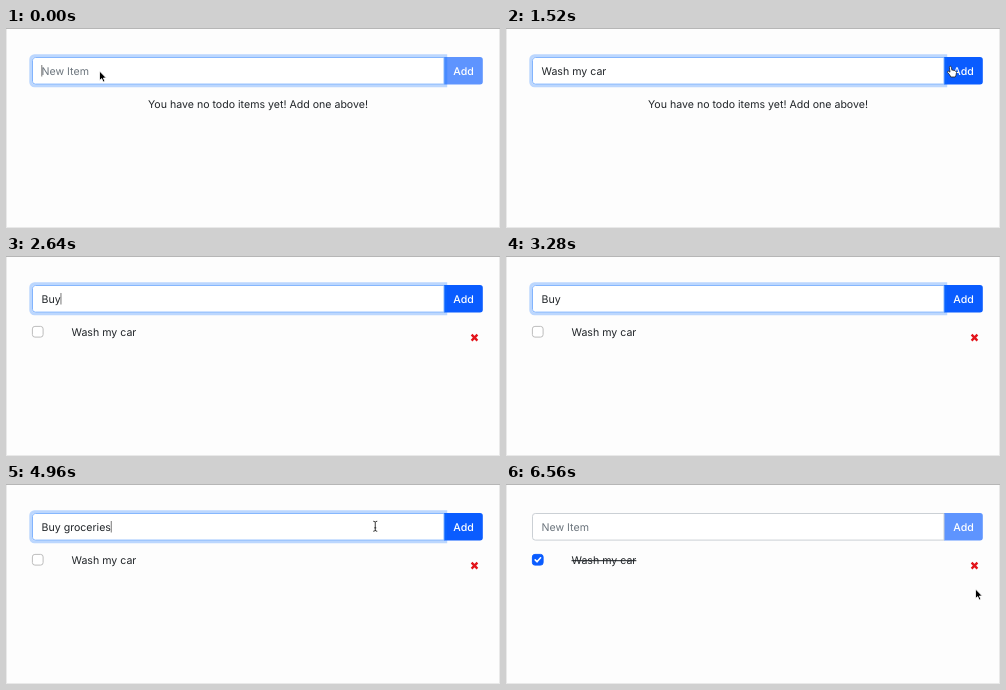
An HTML page for the animation above (6.64 s loop, 494 by 200 pixels).

```html
<!DOCTYPE html>
<html lang="en">
<head>
<meta charset="utf-8">
<title>Todo list</title>
<style>
  html, body { margin: 0; width: 100%; height: 100%; overflow: hidden; background: #fdfdfd; }
  svg { display: block; width: 494px; height: 200px; }
  text { font: 400 10.6px Inter, "Liberation Sans", sans-serif; fill: #212529; white-space: pre; text-rendering: geometricPrecision; }
  .hint { fill: #6c757d; }
  .add { font-weight: 500; fill: #fff; text-anchor: middle; }
  .ring { fill: none; stroke: #0d6efd; stroke-opacity: .27; stroke-width: 2.8; }
  .done text { text-decoration: line-through; }
  .box { fill: #fff; stroke: #bdbdbd; }
  .done .box { fill: #0a5cff; stroke: #0a5cff; }
  .tick { fill: none; stroke: #fff; stroke-width: 1.6; stroke-linecap: round; stroke-linejoin: round; visibility: hidden; }
  .done .tick { visibility: visible; }
  .remove { stroke: #e3141b; stroke-width: 2.3; }
</style>
</head>
<body>
<svg viewBox="0 0 494 200">
  <rect width="494" height="200" fill="#fdfdfd"/>
  <path d="M.5 0V200M493.5 0V200M0 199.5H494" stroke="#e9e9e9"/>
  <path d="M0 .5H494" stroke="#b6b6b6"/>

  <path id="button" d="M438 29h36a2.8 2.8 0 0 1 2.8 2.8v21.9a2.8 2.8 0 0 1-2.8 2.8h-36z" fill="#0a5cff"/>
  <text class="add" x="457.5" y="46.7">Add</text>
  <path id="field" d="M438 29.5H29.3a2.8 2.8 0 0 0-2.8 2.8v21a2.8 2.8 0 0 0 2.8 2.8H438z" fill="#fff"/>
  <path id="fieldRing" class="ring" d="M439.8 27.7H28.5a3.8 3.8 0 0 0-3.8 3.8v22.6a3.8 3.8 0 0 0 3.8 3.8H439.8z"/>
  <text id="value" x="35.5" y="46.7"></text>
  <path id="caret" d="M0 37V48.5" stroke="#555" stroke-width=".8"/>

  <text id="empty" x="252" y="80" text-anchor="middle">You have no todo items yet! Add one above!</text>
  <g id="items"></g>
  <rect id="checkRing" class="ring" x="24.6" y="68.6" width="14.3" height="14.3" rx="3.8"/>

  <g id="pointer">
    <path data-kind="arrow" d="M0 0V9.6L2.2 7.6L3.7 11L5.4 10.3L3.9 7H6.8Z" fill="#000" stroke="#fff" stroke-width=".8"/>
    <path data-kind="beam" d="M-2 -5Q0 -5 0 -3.8Q0 -5 2 -5M0 -3.8V3.8M-2 5Q0 5 0 3.8Q0 5 2 5M-1 1.6H1" fill="none" stroke="#222" stroke-width=".9"/>
    <path data-kind="hand" d="M-1.6 -2.6Q-1.6 -3.8 -.7 -3.8Q.2 -3.8 .4 -2.6L.9 .2Q2.2 -.5 2.7 .6Q4 .1 4.3 1.2Q5.5 1 5.5 2.5L5 5.2L4.2 7H-.2L-1.4 4.7L-3.6 2.2Q-3.6 1 -2.4 1.2L-1 2.2Z" fill="#fff" stroke="#222" stroke-width=".8"/>
  </g>
</svg>
<script>
const LOOP = 6640, STEP = 80, FADE = 150;
const $ = id => document.getElementById(id);

// Start times of each typing burst
const bursts = [
  { from: 160, text: 'Wash my car', clear: 1680 },
  { from: 2480, text: 'Buy ', clear: 4160 },
  { from: 4160, text: 'groceries', prefix: 'Buy ', clear: 5200 }
];
const focusSpans = [[-1000, 1680], [2320, 5200]];
const checkSpans = [[5840, 6400]];
const tracks = [
  [[0, 93.5, 43], [160, 93.5, 43]],
  [[1120, 93.5, 43], [1500, 445, 42], [1680, 445, 42], [2080, 283, 43], [2320, 150, 43], [2480, 150, 43]],
  [[4800, 150, 43], [5040, 446, 42], [5200, 446, 42], [5440, 377, 76], [5760, 31, 75],
   [5920, 31, 75], [6240, 440, 118], [6400, 470, 106], [6560, 469.5, 105], [LOOP, 469.5, 105]]
];
const rows = [
  { text: 'Wash my car', from: 1680, to: LOOP, done: 5840 },
  { text: 'Buy groceries', from: 5200, to: 6480, done: Infinity }
];

$('items').innerHTML = rows.map((row, i) => `
  <g transform="translate(0 ${i * 27})">
    <rect class="box" x="26.4" y="70.4" width="10.7" height="10.7" rx="2.5"/>
    <path class="tick" d="M29.2 75.9L31 77.8L34.6 73.8"/>
    <text x="65.5" y="80">${row.text}</text>
    <path class="remove" d="M465.6 78.6L471.4 84.6M471.4 78.6L465.6 84.6"/>
  </g>`).join('');
const rowNodes = [...$('items').children];
const cursors = [...$('pointer').children];

const clamp = v => Math.max(0, Math.min(1, v));
const ease = v => v * v * (3 - 2 * v);
const show = (node, on) => node.setAttribute('visibility', on ? 'visible' : 'hidden');
const glow = (t, spans) => Math.max(...spans.map(([a, b]) =>
  ease(clamp((t - a) / FADE)) * (1 - ease(clamp((t - b) / FADE)))));

function typed(t) {
  const burst = bursts.find(b => t >= b.from && t < b.clear);
  if (!burst) return { text: '', last: t < 2000 ? 0 : 2320 };
  const n = Math.min(burst.text.length, Math.floor((t - burst.from) / STEP) + 1);
  return { text: (burst.prefix || '') + burst.text.slice(0, n), last: burst.from + (n - 1) * STEP };
}

function pointerAt(t) {
  const track = tracks.find(k => t >= k[0][0] && t < k[k.length - 1][0]);
  if (!track) return null;
  const i = track.findIndex(k => k[0] > t);
  const [t0, x0, y0] = track[i - 1], [t1, x1, y1] = track[i];
  const p = ease((t - t0) / (t1 - t0));
  return [x0 + (x1 - x0) * p, y0 + (y1 - y0) * p];
}

function cursorKind(t, x, y, enabled) {
  if (t < 1000 || y < 29 || y > 57 || x < 26 || x > 477) return 'arrow';
  if (x < 438) return 'beam';
  return enabled ? 'hand' : 'arrow';
}

function render(t) {
  const { text, last } = typed(t);
  const focus = glow(t, focusSpans);
  const focused = focusSpans.some(([a, b]) => t >= a && t < b);
  const value = $('value');
  value.textContent = text || 'New Item';
  value.setAttribute('class', text ? '' : 'hint');
  $('button').setAttribute('opacity', text ? 1 : .65);
  $('field').setAttribute('stroke', focus > .5 ? '#86b7fe' : '#cbd0d5');
  $('fieldRing').setAttribute('opacity', focus);

  const width = text ? value.getComputedTextLength() : 0;
  $('caret').setAttribute('transform', `translate(${35.8 + width} 0)`);
  show($('caret'), focused && (t - last) % 1000 < 500);

  show($('empty'), t < rows[0].from);
  rows.forEach((row, i) => {
    rowNodes[i].style.display = t >= row.from && t < row.to ? '' : 'none';
    rowNodes[i].setAttribute('class', t >= row.done ? 'done' : '');
  });
  $('checkRing').setAttribute('opacity', glow(t, checkSpans));

  const at = pointerAt(t);
  $('pointer').style.display = at ? '' : 'none';
  if (at) {
    const kind = cursorKind(t, ...at, text !== '');
    $('pointer').setAttribute('transform', `translate(${at})`);
    cursors.forEach(c => show(c, c.dataset.kind === kind));
  }
}

const start = performance.now();
function tick() {
  const t = (performance.now() - start) % LOOP;
  render(Math.floor(t / STEP) * STEP);
  requestAnimationFrame(tick);
}
tick();
</script>
</body>
</html>
```
